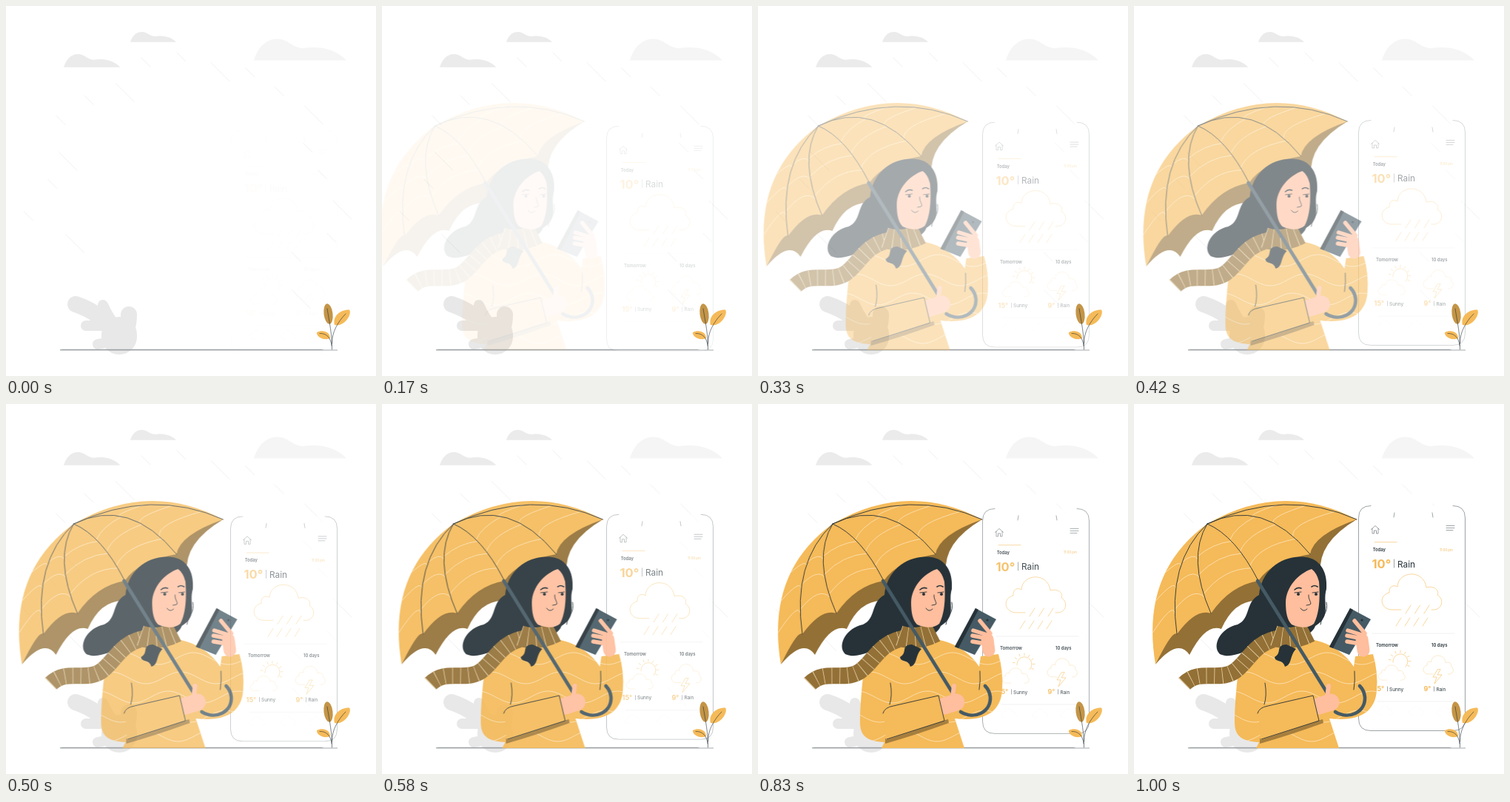
Write an HTML page that moves like this. It is 500 px wide and 500 px high and loops after 1.04 s.

```html
<!DOCTYPE html>
<html lang="en">
<head>
<meta charset="utf-8">
<title>Rain forecast</title>
<style>
html, body { margin: 0; width: 100%; height: 100%; overflow: hidden; background: #fff; }
svg { display: block; width: 100%; height: 100%; font-family: Inter, "Open Sans", sans-serif; }
.yellow { fill: #f5ba59; }
.brown { fill: #937036; }
.dark { fill: #263238; }
.skin { fill: #ffbe9d; }
.line { fill: none; stroke-linecap: round; stroke-linejoin: round; }
.ink { stroke: #263238; stroke-width: .9; }
.fine { stroke: #263238; stroke-width: .45; }
.cream { stroke: #fde6be; stroke-width: .8; }
.gold { stroke: #f5ba59; stroke-width: .6; vector-effect: non-scaling-stroke; }
.pale { stroke: #e8e8e8; stroke-width: .6; vector-effect: non-scaling-stroke; }
.shaft { stroke: #455a64; stroke-width: 4.6; }
.limb { stroke: #ffbe9d; }
.lobe { stroke: #e8e8e8; }
.knit { fill: none; stroke: #937036; }
.knit + .knit { stroke: #e9d3a6; stroke-dasharray: .8 10; }
text { fill: #263238; }
.bold { font-weight: 600; }
.amber { fill: #f5ba59; }
.big { font-weight: 700; }
</style>
</head>
<body>
<svg viewBox="0 0 500 500">
  <defs>
    <path id="cloud" d="M0 29C5 13 15 0 32 0C46 0 52 12 66 12.500C85 10 108 11 125 29Z"/>
    <path id="puff" d="M26 48H12C-3 46-4 28 10 25C9 16 16 14 21 17C22-5 57-7 60 18C71 15 78 22 75 28C85 34 81 48 70 48H67"/>
    <path id="coat" d="M190 317C158 317 145 337 141 360C138 386 136 410 136 430C136 449 146 456 169 457L165 465H277L264 425C306 430 326 415 328 387Q330 362 323 338L299 341L297 355C282 332 257 319 230 317Z"/>
    <clipPath id="coatClip"><use href="#coat"/></clipPath>
  </defs>

  <use href="#cloud" transform="translate(78 65) scale(.61)" fill="#ebebeb"/>
  <use href="#cloud" transform="translate(168 35) scale(.496 .47)" fill="#ebebeb"/>
  <use href="#cloud" transform="translate(335 44.500)" fill="#f5f5f5"/>
  <path id="rain" class="line pale"/>

  <g class="line lobe">
    <path d="M94 403Q128 414 152 446M154 446Q166 440 166 417" stroke-width="22"/>
    <path d="M131 404Q138 420 152 438M108 432H146M124 457L150 452" stroke-width="14"/>
    <path d="M153 444V447" stroke-width="48"/>
  </g>
  <path d="M72 465L76 463.700H426L430 465Z" fill="#b0b4b6"/>
  <path d="M73 465H448" stroke="#7d8487" stroke-width=".7"/>

  <g id="phone">
    <rect x="303.500" y="137.500" width="144" height="304" rx="16" fill="#fff"/>
    <path class="line fine" d="M320 137.500Q303.500 137.500 303.500 154V425Q303.500 441.500 320 441.500H431Q447.500 441.500 447.500 425V154Q447.500 137.500 431 137.500M352 147L351 153M403 147L404 153"/>
    <path class="line fine" d="M320.500 169.500L326 164.500L331.500 169.500M322 168.500V175H324.500V171H327.500V175H330V168.500M422 164.500H433M422 167.500H433M422 170.500H431"/>
    <path class="line gold" d="M325 186.700H355"/>
    <text class="bold" x="322.700" y="199" font-size="5.800">Today</text>
    <text class="amber" x="413" y="198.500" font-size="4.300">11:00 pm</text>
    <text class="big amber" x="321.500" y="222" font-size="16.500">10°</text>
    <text x="356" y="220.500" font-size="11.800">Rain</text>
    <path class="line fine" d="M351.500 210V221M342.500 382V388M405.500 382V388"/>
    <use href="#puff" class="line gold" transform="translate(335 230)"/>
    <path id="drizzle" class="line gold"/>
    <path class="line pale" d="M322 310H433M329 402H433"/>
    <text class="bold" x="327" y="328" font-size="6.100">Tomorrow</text>
    <text class="bold" x="402" y="328" font-size="5.900">10 days</text>
    <use href="#puff" class="line gold" transform="translate(330 353) scale(.45 .42)"/>
    <path id="sun" class="line gold"/>
    <use href="#puff" class="line gold" transform="translate(391 340) scale(.5 .52)"/>
    <path class="line gold" d="M410 359L404 369H409L406 378L416 366H410L414 359Z"/>
    <use href="#puff" class="line pale" transform="translate(329 408) scale(.25)"/>
    <use href="#puff" class="line pale" transform="translate(371 408) scale(.25)"/>
    <use href="#puff" class="line pale" transform="translate(409 408) scale(.25)"/>
    <text class="big amber" x="324.500" y="388.300" font-size="9">15°</text>
    <text x="345" y="387.700" font-size="6.500">Sunny</text>
    <text class="big amber" x="391.500" y="388.300" font-size="9">9°</text>
    <text x="408.500" y="387.700" font-size="6.300">Rain</text>
  </g>

  <g id="girl">
    <path id="lining" class="brown"/>
    <path id="canopy" class="yellow"/>
    <path id="ripples" class="line cream"/>
    <path id="ribs" class="line ink"/>

    <path class="dark" d="M232 207C200 203 172 225 169 258C150 268 158 290 140 298C118 302 104 326 116 338C135 346 150 330 170 332C200 326 240 316 245 300C268 286 254 270 260 250C262 225 250 209 232 207Z"/>
    <use href="#coat" class="yellow"/>
    <path id="waves" class="line cream" clip-path="url(#coatClip)"/>
    <path class="line ink" d="M177 377Q180 394 176 406M298 361Q299 374 297 386"/>

    <!-- scarf -->
    <g stroke-width="22">
      <path class="knit" d="M68 378C88 358 112 374 133 363S160 320 200 316"/>
      <path class="knit" d="M68 378C88 358 112 374 133 363S160 320 200 316"/>
    </g>
    <g stroke-width="28">
      <path class="knit" d="M189 313Q212 321 238 308"/>
      <path class="knit" d="M189 313Q212 321 238 308"/>
    </g>
    <path class="dark" d="M206 325C190 326 201 336 190 342C191 350 201 344 204 355C214 352 210 340 219 331Z"/>

    <!-- face -->
    <path class="skin" d="M240 223C222 229 205 248 205 268C205 282 207 292 213 298Q232 306 243 297C252 280 251 255 250 240Q247 228 240 223Z"/>
    <path class="line ink" d="M260 268C263 282 254 285 252 298M217 255L226 254M241 255L249 254M236 258C235 264 241 269 238 271L233 272M225 276Q229 282 234 277"/>
    <path class="line ink" style="stroke-width:1.600" d="M217 251Q221 247 226 249M240 247Q244 244 248 247"/>
    <circle class="dark" cx="222" cy="257" r="2"/>
    <circle class="dark" cx="246" cy="257" r="2"/>

    <path class="line shaft" d="M167 239L262 392M272 416C290 427 313 417 312 396Q311 387 305 381"/>

    <!-- device and far hand -->
    <path d="M292 276L320 291L291 339L264 328Z" fill="#455a64"/>
    <path class="dark" d="M292 276L296 278L269 330L264 328Z"/>
    <circle class="dark" cx="308" cy="292" r="1.500"/>
    <g class="line limb">
      <path d="M298 293L312 310M289 306L308 312M288 313L308 317M288 321L306 324" stroke-width="5.500"/>
      <path d="M308 318L310 333" stroke-width="17"/>
    </g>

    <!-- near hand and sleeve -->
    <g class="line limb">
      <path d="M263 381L261 396" stroke-width="6"/>
      <path d="M250 408L266 403" stroke-width="23"/>
    </g>
    <path class="brown" opacity=".8" d="M170 452L255 426L256 431Q212 447 170 459Z"/>
    <path class="yellow" d="M168 412L242 394L250 428L171 454Z"/>
    <path class="line ink" d="M167 418Q169 410 181 408L242 394L250 428L172 453"/>
  </g>

  <ellipse cx="435.500" cy="416" rx="6" ry="13.800" transform="rotate(-7 435.500 416)" fill="#c49547"/>
  <path class="yellow" d="M444 431C441 419 452 410 464 410.500C468 416 458 434 444 431ZM438 449C428 453 419 446 420 441C428 437 438 440 438 449Z"/>
  <path class="line ink" style="stroke-width:.6" d="M440.500 464C441 446 437 427 434 409M440.500 456C440 441 449 426 459 416M440 459C439 448 433 442 424 442.500"/>
</svg>
<script>
const $ = id => document.getElementById(id);
const draw = (id, parts) => $(id).setAttribute('d', [parts].flat().join(''));
const range = (n, f) => Array.from({ length: n }, (_, i) => f(i));
const mix = (a, b, t) => a.map((v, i) => v + (b[i] - v) * t);

// Umbrella: every rib leaves the apex and bends through a control point to its tip.
const apex = [99, 162];
const ribs = [
  { ctl: [8, 228], tip: [29, 352] },
  { ctl: [44, 214], tip: [58, 311] },
  { ctl: [71, 208], tip: [104, 283] },
  { ctl: [137, 178], tip: [168, 239] },
  { ctl: [174, 125], tip: [238, 203] },
  { ctl: [205, 113], tip: [301, 156] }
];
const onRib = ({ ctl, tip }, t) => mix(mix(apex, ctl, t), mix(ctl, tip, t), t);
const scallop = (a, b, pull) => `Q${mix(mix(a, b, .5), apex, pull)} ${b}`;
const hem = pts => pts.slice(1).map((p, i) => scallop(pts[i], p, .16)).join('');

const tips = ribs.map(r => r.tip);
const inner = [tips[0], [75, 339], [118, 304], [166, 266], [252, 228], tips[5]];
draw('lining', `M${apex}L${inner[0]}${hem(inner)}Z`);
draw('canopy', `M${apex}Q${ribs[0].ctl} ${tips[0]}${hem(tips)}Q200 103 ${apex}Z`);
draw('ribs', ribs.slice(1).map(r => `M${apex}Q${r.ctl} ${r.tip}`));
draw('ripples', [.42, .62, .82].flatMap(t => range(5, i => {
  const a = onRib(ribs[i], t), b = onRib(ribs[i + 1], t + .03);
  return `M${a}${scallop(a, b, .22)}`;
})));

// Knitted waves across the coat.
draw('waves', range(5, row => 'M' + range(70, i => {
  const x = 130 + i * 3;
  return [x, 344 + row * 26 - 8 * Math.sin((x - 143 + row * 17) / 15)];
}).join('L')));

// Rain around the edge of the scene, open towards the lower left of the ground.
let seed = 7;
const random = () => (seed = seed * 16807 % 2147483647) / 2147483647;
draw('rain', range(19, i => {
  const a = (-200 + i * 13.5) * Math.PI / 180, r = .78 + .24 * random();
  const len = i % 3 ? 12 : 25;
  return `M${238 + 215 * r * Math.cos(a)} ${255 + 200 * r * Math.sin(a)}l${len} ${len}`;
}));

// Forecast icons.
draw('drizzle', range(7, i => i < 3
  ? `M${374 + i * 12.5} 272l-7 11`
  : `M${361 + (i - 3) * 12} 289l-7 11`));
draw('sun', 'M350 349A10 10 0 1 1 367 355' + range(8, i => {
  const a = (-170 + i * 28) * Math.PI / 180, c = Math.cos(a), s = Math.sin(a);
  return `M${359 + 12 * c} ${348 + 12 * s}L${359 + 15 * c} ${348 + 15 * s}`;
}).join(''));

// Both moving parts hold each pose for one step, 24 per second.
const LOOP = 1040, STEPS = 25;
function play(id, pose) {
  const frames = range(STEPS, k => ({
    ...pose(k < 2 ? 0 : k),
    offset: Math.round(k * 100 / 24) * 10 / LOOP,
    easing: 'step-end'
  }));
  frames.push({ ...pose(STEPS - 1), offset: 1 });
  $(id).animate(frames, { duration: LOOP, iterations: Infinity });
}
const ramp = (k, from, to) => Math.min(1, Math.max(0, (k - from) / (to - from)));

// Slide in from the left with a slight overshoot.
play('girl', k => {
  const t = ramp(k, 3, 15), over = 2 * Math.sin(Math.PI * ramp(k, 15, 23));
  return { opacity: t, transform: `translate(${30 * (t - 1) + over}px, 0px)` };
});
// Rise at a steady speed.
play('phone', k => {
  const t = ramp(k, 0, 23);
  return { opacity: Math.max(t, .015), transform: `translate(0px, ${30 * (1 - t)}px)` };
});
</script>
</body>
</html>
```
